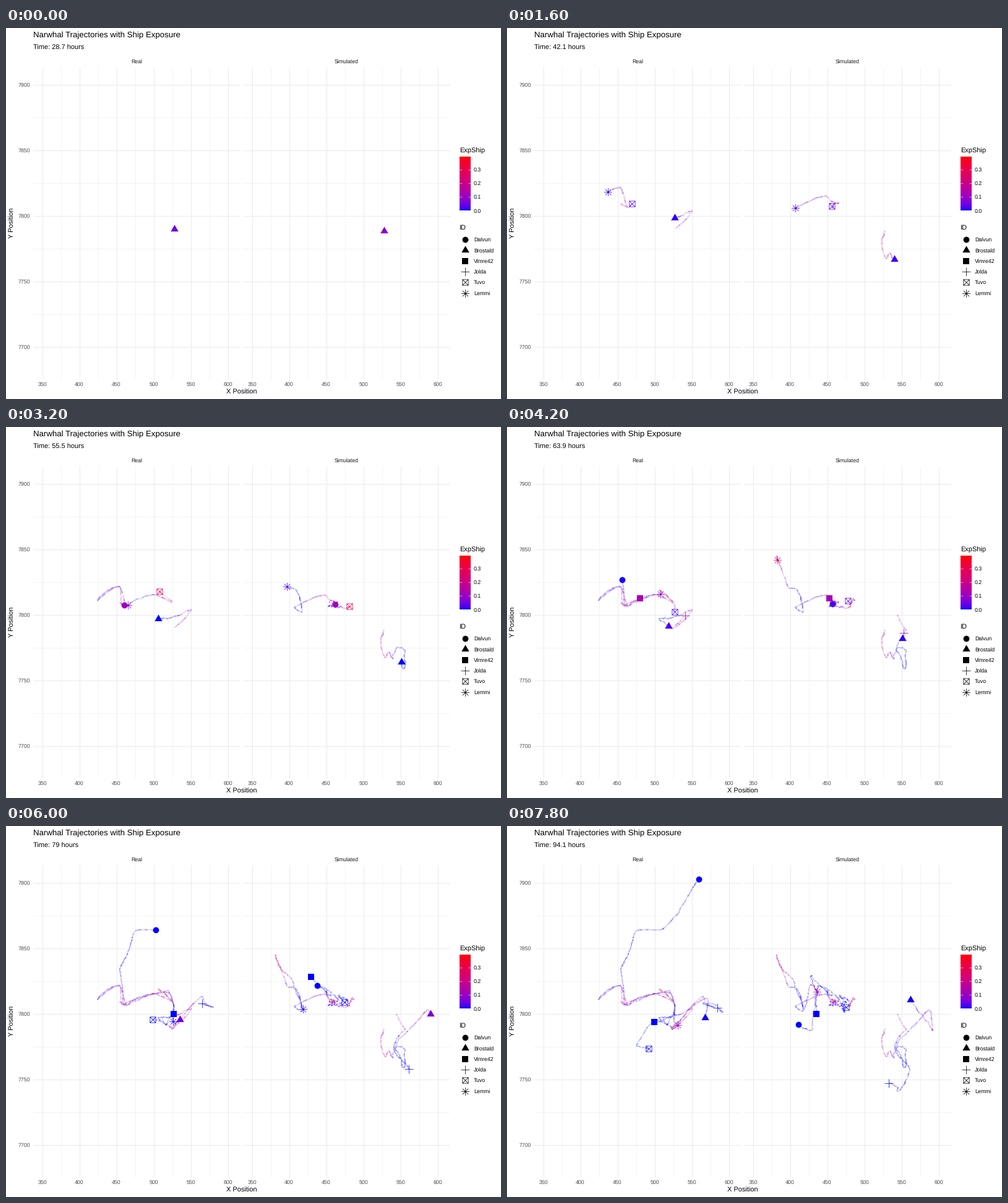
A matplotlib script for the animation above (8 s loop, 800x600 px).

```python
import matplotlib.pyplot as plt
import numpy as np
from matplotlib.animation import FuncAnimation
from matplotlib.collections import LineCollection
from matplotlib.path import Path

plt.rcParams["font.family"] = "Liberation Sans"
plt.rcParams["text.hinting"] = "none"

PT = 0.72            # points per pixel at 100 dpi
FRAMES, STEP_MS = 40, 200
SUB = 6              # trail samples per frame
R = 4.62             # marker radius in pixels
E_MAX = 0.388
GRID, GREY = "#EBEBEB", "#4D4D4D"
rng = np.random.default_rng(7)

fig = plt.figure(figsize=(8, 6), dpi=100, facecolor="white")
ax = fig.add_axes([0, 0, 1, 1])


def ramp(e):
    """Blue to red through CIE Lab."""
    t = np.clip(np.atleast_1d(e) / E_MAX, 0, 1)[:, None]
    lab = (1 - t) * [32.30, 79.19, -107.86] + t * [53.24, 80.09, 67.20]
    fy = (lab[:, 0] + 16) / 116
    f = np.stack([fy + lab[:, 1] / 500, fy, fy - lab[:, 2] / 200], axis=1)
    xyz = np.where(f > 6 / 29, f ** 3, 3 * (6 / 29) ** 2 * (f - 4 / 29))
    xyz = xyz * [0.9505, 1.0, 1.089]
    lin = xyz @ np.array([[3.2406, -0.9689, 0.0557],
                          [-1.5372, 1.8758, -0.2040],
                          [-0.4986, 0.0415, 1.0570]])
    lin = np.clip(lin, 0, 1)
    return np.where(lin <= 0.0031308, 12.92 * lin,
                    1.055 * lin ** (1 / 2.4) - 0.055)


def text(x, y, s, size, color="black", ha="left", rotation=0):
    return ax.text(x, y, s, fontsize=size * PT, color=color, ha=ha,
                   va="baseline", rotation=rotation, rotation_mode="anchor")


def strokes(*pairs):
    return Path([p for pair in pairs for p in pair],
                [Path.MOVETO, Path.LINETO] * len(pairs))


def polygon(n, radius, turn):
    a = turn + 2 * np.pi * np.arange(n + 1) / n
    return Path(radius * np.stack([np.cos(a), np.sin(a)], axis=1), closed=True)


Q = 2 ** 0.5
SQUARE = polygon(4, Q, np.pi / 4)
PLUS = strokes([(-Q, 0), (Q, 0)], [(0, -Q), (0, Q)])
CROSS = strokes([(-1, -1), (1, 1)], [(-1, 1), (1, -1)])
# path, filled, edge width in pixels
SHAPES = [
    (Path.unit_circle(), True, 0.5),
    (polygon(3, 1.555, np.pi / 2), True, 0),
    (SQUARE, True, 0),
    (PLUS, False, 0.75),
    (Path.make_compound_path(SQUARE, CROSS), False, 0.75),
    (Path.make_compound_path(PLUS, CROSS), False, 0.75),
]
DISC, TRI, BOX, CROSSHAIR, XBOX, STAR = range(6)
NAMES = ["Dalvun", "Brostald", "Vimre42", "Jolda", "Tuvo", "Lemmi"]


def paint(mark, shape, color):
    mark.set_markeredgecolor(color)
    mark.set_markerfacecolor(color if SHAPES[shape][1] else "none")


def marker(x, y, shape, color="black"):
    path, _, edge = SHAPES[shape]
    size = 2 * R * np.abs(path.vertices).max()
    mark, = ax.plot([x], [y], ls="", marker=path, ms=size * PT,
                    mew=edge * PT, zorder=5 + 0.1 * shape)
    paint(mark, shape, color)
    return mark


def draw_panels():
    for left, title in [(44, "Real"), (383, "Simulated")]:
        right, first = left + 334, left + 14.5
        for width, dx, dy, n in [(0.53, 30, 53, 5), (1.07, 0, 0, 6)]:
            style = dict(colors=GRID, lw=width * PT, zorder=1)
            ax.vlines(first + dx + 60 * np.arange(n), 63, 568, **style)
            ax.hlines(91.5 + dy + 106 * np.arange(n - 1), left, right, **style)
        text(left + 167, 57, title, 8.8, "#1A1A1A", "center")
        for k in range(6):
            text(first + 60 * k, 579, str(350 + 50 * k), 8.8, GREY, "center")
    for k in range(5):
        text(39, 94.7 + 106 * k, str(7900 - 50 * k), 8.8, GREY, "right")
    text(44, 15, "Narwhal Trajectories with Ship Exposure", 13.2)
    text(380.5, 592, "X Position", 11, ha="center")
    text(13, 315, "Y Position", 11, ha="center", rotation=90)


def draw_legends():
    left, right, bottom = 733.4, 750.7, 295.1
    text(733, 202, "ExpShip", 11)
    bar = ramp(np.linspace(0, E_MAX, 120))[:, None, :]
    ax.imshow(bar, extent=(left, right, bottom, bottom - 86.4),
              origin="lower", aspect="auto", zorder=2)
    for k in range(4):
        y = bottom - 22.2 * k
        ax.hlines([y, y], [left, right - 3.5], [left + 3.5, right],
                  colors="white", lw=0.53 * PT, zorder=3)
        text(756, y + 3.4, f"{k / 10:.1f}", 8.8)
    text(733, 326, "ID", 11)
    for k, name in enumerate(NAMES):
        y = 342 + 17.3 * k
        marker(741.7, y, k)
        text(756, y + 3.2, name, 8.8)


def spline(t, knots, tension=0.6):
    """Smooth curve through (time, x, y) knots."""
    kt, p = knots[:, 0], knots[:, 1:]
    slope = tension * np.gradient(p, kt, axis=0)
    i = np.clip(np.searchsorted(kt, t, side="right") - 1, 0, len(kt) - 2)
    h = (kt[i + 1] - kt[i])[:, None]
    u = (t - kt[i])[:, None] / h
    ease = u * u * (3 - 2 * u)
    return (p[i] + (p[i + 1] - p[i]) * ease
            + h * u * (1 - u) * ((1 - u) * slope[i] - u * slope[i + 1]))


def wander(t, knot_times, rough):
    """Random walk that comes back to zero at every knot."""
    walk = np.cumsum(rng.normal(0, rough, (len(t), 2)), axis=0)
    return np.stack([w - np.interp(t, knot_times, np.interp(knot_times, t, w))
                     for w in walk.T], axis=1)


tracks = []


def track(shape, rough, peaks, *knots):
    """Animal seen from its first knot on; peaks are (frame, exposure)."""
    knots = np.array(knots, float)
    start = int(knots[0, 0])
    t = start + np.arange((FRAMES - 1 - start) * SUB + 1) / SUB
    xy = spline(t, knots) + wander(t, knots[:, 0], rough)
    rgb = ramp(sum(e * np.exp(-((t - c) / 3) ** 2) for c, e in peaks))
    # uneven opacity gives the dotted look of overlapping short segments
    faint = 0.1 + 0.55 * rng.beta(1, 2.2, (len(t), 1))
    trail = LineCollection([], linewidths=2 * PT, zorder=4, capstyle="butt")
    ax.add_collection(trail, autolim=False)
    segs = np.stack([xy[:-1], xy[1:]], axis=1)
    tracks.append((shape, start, xy, np.hstack([rgb, faint]), segs, trail,
                   marker(-50, -50, shape)))


draw_panels()
draw_legends()
subtitle = text(44, 35, "", 11)

# left panel
track(DISC, 0.4, [(15, .12)], (14, 190, 290), (16, 191, 288), (20, 188, 260),
      (22, 184, 234), (25, 198, 201), (28, 210, 169), (30, 242, 168),
      (34, 276, 142), (39, 310, 86))
track(TRI, 0.45, [(3, .12), (25, .12), (33, .10)], (0, 272, 325),
      (4, 299, 295), (8, 271, 307), (16, 246, 310), (25, 270, 328),
      (30, 281, 313), (34, 304, 289), (37, 325, 281), (39, 320, 310))
track(BOX, 0.4, [(20, .14)], (18, 188, 289), (20, 205, 282), (23, 242, 271),
      (25, 263, 270), (30, 271, 304), (34, 262, 309), (39, 238, 317))
track(CROSSHAIR, 0.45, [(20, .14)], (19, 266, 327), (24, 318, 276),
      (25, 320.5, 285.5), (28, 335, 293), (30, 317, 287), (34, 331.5, 287),
      (37, 349, 301), (39, 340, 294))
track(XBOX, 0.5, [(4, .15), (16, .26)], (4, 184, 284), (6, 194, 290),
      (8, 202, 284), (12, 238, 271), (15, 268, 282), (16, 248, 266),
      (19, 269, 285), (25, 259, 322), (30, 237, 313), (34, 210, 354),
      (39, 229, 360))
track(STAR, 0.4, [(3, .14), (15, .07), (21, .08), (36.5, .20)],
      (3, 194, 290), (6, 183, 258), (8, 163, 265), (11, 148, 281),
      (13.5, 184, 258), (15, 188, 289), (16, 197, 288), (20, 240, 271),
      (23, 263, 266), (25, 270, 285), (30, 270, 316), (34, 266, 328),
      (39, 276, 322))

# right panel
track(DISC, 0.8, [(17, .12)], (14, 531, 281), (16, 532, 287), (20, 523, 284),
      (25, 542, 287), (30, 503, 258), (34, 497, 295), (36.5, 492, 331),
      (39, 471, 321))
track(TRI, 0.6, [(3, .20), (26, .12), (33, .10)], (0, 610.5, 328),
      (2.5, 606, 350), (4, 613, 373), (5.2, 619, 364), (8, 626, 374),
      (11, 632, 356), (13.5, 645, 362), (15, 643, 391), (16, 639, 380),
      (19.5, 630, 354), (25, 675, 302), (30, 686, 304), (32.5, 689, 331),
      (34, 681, 318), (37, 664, 299), (39, 652, 281))
track(BOX, 0.8, [(18, .30)], (18, 531, 287), (25, 518, 268), (27, 526, 274),
      (30, 493, 244), (34, 497.5, 262), (39, 499.5, 304))
track(CROSSHAIR, 0.6, [(18, .12)], (18, 631, 304), (20.5, 645, 330),
      (22.5, 631, 344), (25, 627, 363), (30, 651, 393), (32, 645, 410),
      (34, 632, 430), (36.5, 632, 424), (39, 617, 416))
track(XBOX, 0.95, [(4, .16), (16.5, .27)], (3, 523, 280), (5, 535, 284),
      (8, 525, 288), (12, 538, 291), (16, 555, 290), (19, 562, 280),
      (25, 538, 277), (30, 547, 285), (34, 546, 300), (39, 548, 293))
track(STAR, 0.5, [(4, .08), (21, .25), (36.5, .22)], (3, 524, 285),
      (5, 515, 271), (8, 466, 291), (10, 478, 299), (13, 470, 266),
      (16, 454, 258), (20, 436, 208), (23, 448, 236), (25, 462, 247),
      (30, 480, 296), (34, 490, 258), (39, 501, 268))

ax.set_xlim(0, 800)
ax.set_ylim(600, 0)
ax.axis("off")


def update(n):
    hours = f"{28.7 + 1.677 * n:.1f}".removesuffix(".0")
    subtitle.set_text(f"Time: {hours} hours")
    for shape, start, xy, rgba, segs, trail, mark in tracks:
        k = max(0, (n - start) * SUB)
        trail.set_segments(segs[:k])
        trail.set_color(rgba[:k])
        mark.set_visible(n >= start)
        mark.set_data([xy[k, 0]], [xy[k, 1]])
        paint(mark, shape, rgba[k, :3])


anim = FuncAnimation(fig, update, frames=FRAMES, interval=STEP_MS,
                     init_func=lambda: update(0), repeat=True,
                     repeat_delay=0, blit=False)
plt.show()
```
